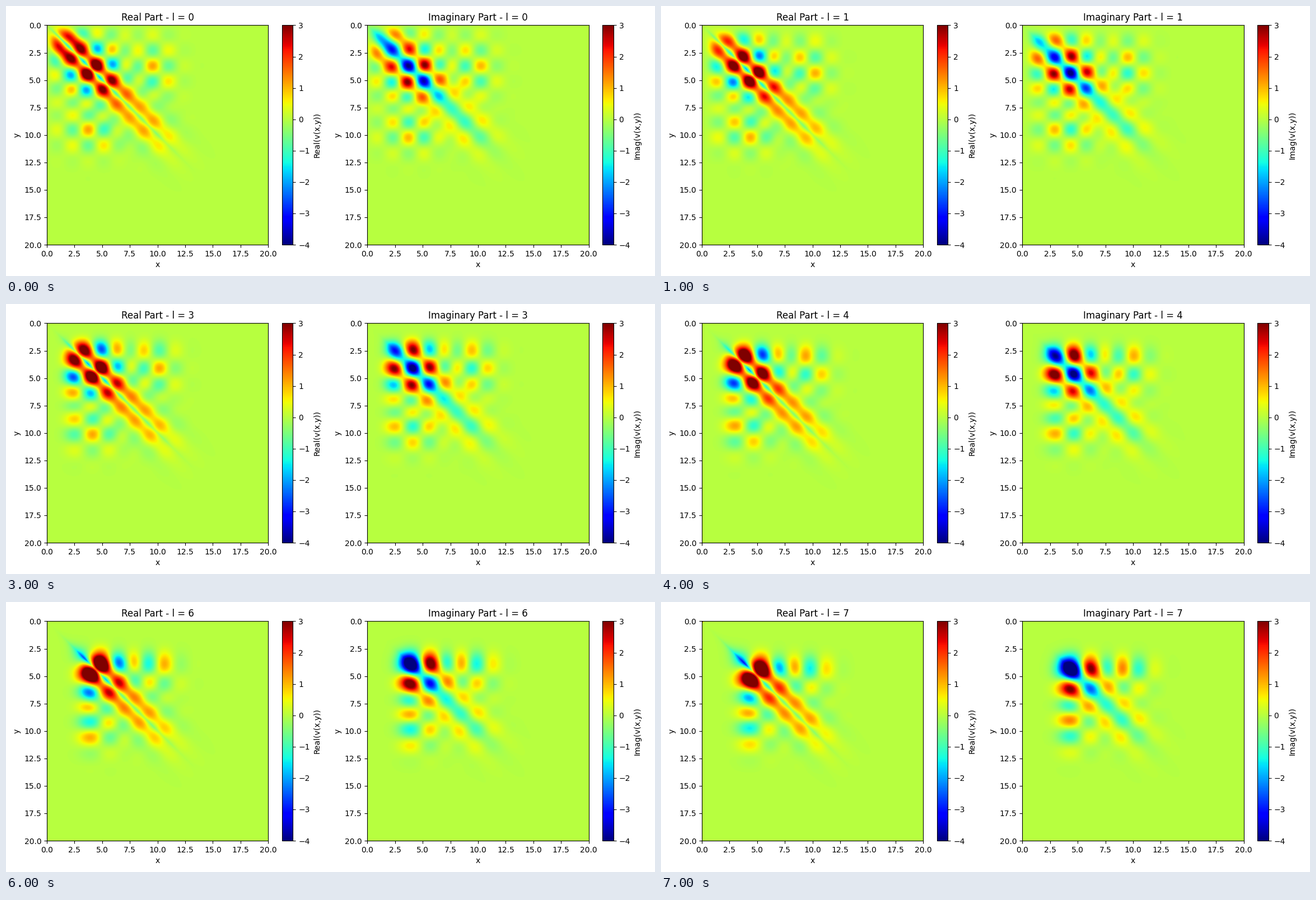
Write a matplotlib script that moves like this. It is 1159x483 px and loops after 8 s.

```python
import numpy as np
import matplotlib.pyplot as plt
from matplotlib.animation import FuncAnimation

W, H, DPI = 1159, 483, 100
SIZE, N = 20, 400
FRAMES, INTERVAL = 8, 1000

plt.rcParams["font.family"] = "DejaVu Sans"

r = (np.arange(N) + 0.5) * SIZE / N
X, Y = np.meshgrid(r, r)
LOW, SEP, MID = np.minimum(X, Y), np.abs(X - Y), (X + Y) / 2
NODES, WEIGHTS = np.polynomial.legendre.leggauss(70)


def regular(l, z):
    """Riccati-Bessel function z * j_l(z)."""
    p = np.polynomial.legendre.Legendre.basis(l)(NODES)
    waves = np.exp(1j * np.outer(z, NODES))
    return z * ((-1j) ** l * (waves @ (WEIGHTS * p)) / 2).real


def irregular(l, z):
    """Riccati-Neumann function -z * y_l(z)."""
    a, b = np.cos(z), np.cos(z) / z + np.sin(z)
    for n in range(1, l + 1):
        a, b = b, (2 * n + 1) / z * b - a
    return a


def bell(x, centre, width):
    return np.exp(-((x - centre) / width) ** 2 / 2)


INNER = 1.7 * bell(r, 4.3, np.where(r < 4.3, 2.2, 1.95))
OUTER = 0.7 * bell(r, 9.5, 1.5)


def radial(func, l):
    """Wave inside the nucleus joined to the shifted wave outside it."""
    return INNER * func(l, 2.13 * r) - OUTER * func(l, 1.93 * r + 6.77)


def potential(l):
    """Real and imaginary part of the nonlocal potential v_l(x, y)."""
    u, w = radial(regular, l), radial(irregular, l)
    real = -np.where(X <= Y, np.outer(w, u), np.outer(u, w))
    imag = -np.outer(u, u)

    # band along the diagonal, cut off below the turning point
    band = 1.4 * np.exp(-(MID / 9.8) ** 4.5)
    if l == 0:
        band += 0.8 * bell(MID, 1.7, 0.57)
    band /= 1 + np.exp(-(LOW - 0.5 - 0.45 * l) / 0.25)
    fade = np.exp(-(SEP / 3) ** 2)
    real += band * (1.35 * np.sin(1.42 * SEP) * fade - 0.4 * np.exp(-SEP / 0.3))
    imag -= band * np.cos(1.42 * SEP) * fade
    return real, imag


fig = plt.figure(figsize=((W + 1e-6) / DPI, (H + 1e-6) / DPI), dpi=DPI)


def place(left, width):
    return fig.add_axes([left / W, 56 / H, width / W, 392.5 / H])


def panel(left, bar_left, name):
    ax = place(left, 395.3)
    im = ax.imshow(np.zeros((N, N)), cmap="jet", vmin=-4, vmax=3,
                   extent=(0, SIZE, SIZE, 0), aspect="auto",
                   interpolation="bilinear")
    ax.set_xticks(np.arange(0, 20.1, 2.5))
    ax.set_yticks(np.arange(0, 20.1, 2.5))
    ax.set_xlabel("x")
    ax.set_ylabel("y")
    fig.colorbar(im, cax=place(bar_left, 19.6), label=f"{name}(v(x,y))")
    return ax, im


panels = [panel(73, 492.8, "Real"), panel(645.3, 1065.3, "Imag")]
titles = ["Real Part", "Imaginary Part"]
fields = [potential(l) for l in range(FRAMES)]


def update(l):
    for (ax, im), title, field in zip(panels, titles, fields[l]):
        im.set_data(field)
        ax.set_title(f"{title} - l = {l}")
    return [im for _, im in panels]


update(0)
anim = FuncAnimation(fig, update, frames=FRAMES, interval=INTERVAL,
                     repeat=True, repeat_delay=0, blit=False)
plt.show()
```
